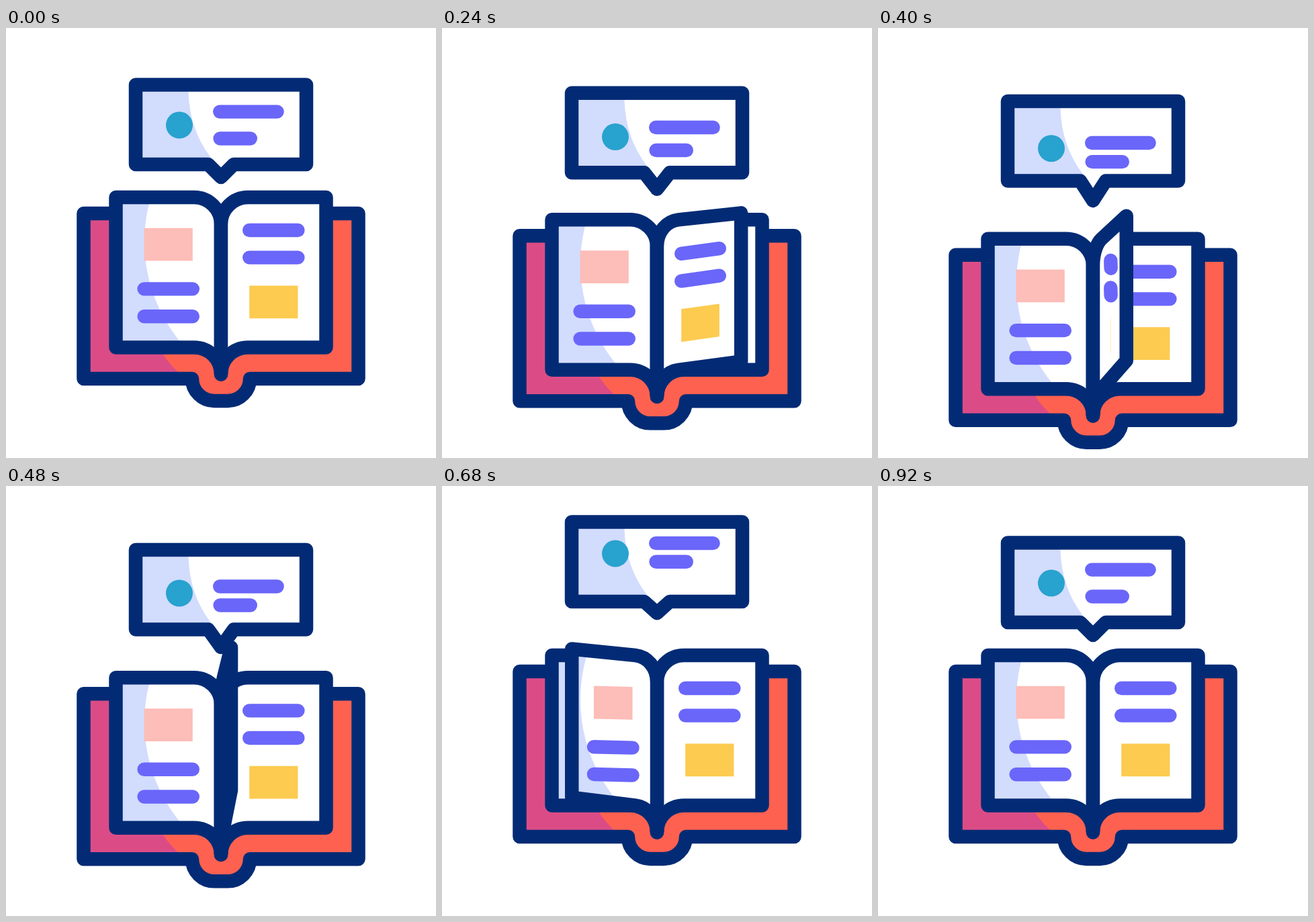
Animation of 640 by 640 pixels, one loop 2 s. Source, as an HTML page with a canvas:

```html
<!DOCTYPE html>
<html lang="en">
<head>
<meta charset="utf-8">
<title>Open book</title>
<style>
html, body { margin: 0; width: 100%; height: 100%; overflow: hidden; background: #fff; }
canvas { display: block; width: 640px; height: 640px; }
</style>
</head>
<body>
<canvas id="stage"></canvas>
<script>
const LOOP = 2000, STEP = 40;
const NAVY = '#032b75', WHITE = '#ffffff', SHADE = '#d2dcfd', VIOLET = '#6a66f9';
const CORAL = '#ff6150', MAGENTA = '#db4c86', PINK = '#fdbdb8', YELLOW = '#fdcb50', TEAL = '#28a2ce';
const RIGHT = 476.5, LEFT = 163.5, SPINE = 320;

const canvas = document.getElementById('stage');
const ctx = canvas.getContext('2d');
const ratio = window.devicePixelRatio || 1;
canvas.width = canvas.height = 640 * ratio;

const clamp = u => Math.max(0, Math.min(1, u));
const lerp = (a, b, u) => a + (b - a) * u;
const smooth = u => u * u * (3 - 2 * u);
const easeIn = u => u * u * (2 - u);
const soft = amount => u => lerp(u, smooth(u), amount);
const span = (t, from, to, ease) => ease(clamp((t - from) / (to - from)));

// Bubble parts sink to `low`, spring up to `high`, then settle.
function bounce(t, low, high) {
  if (t < 400) return low * span(t, 0, 400, easeIn);
  if (t < 680) return lerp(low, high, span(t, 400, 680, soft(0.4)));
  return high * (1 - span(t, 680, 920, soft(0.3)));
}

function bookDrop(t) {
  return 66.7 * (span(t, 120, 360, smooth) - span(t, 360, 600, smooth));
}

function pageEdge(t) {
  return t < 480
    ? lerp(RIGHT, 335, span(t, 100, 480, easeIn))
    : lerp(335, LEFT, span(t, 480, 740, soft(0.6)));
}

function fill(path, color) {
  ctx.fillStyle = color;
  ctx.fill(path);
}

function outline(path) {
  ctx.strokeStyle = NAVY;
  ctx.lineWidth = 20.5;
  ctx.stroke(path);
}

function bar(x1, y1, x2, y2) {
  ctx.strokeStyle = VIOLET;
  ctx.lineWidth = 20.4;
  ctx.beginPath();
  ctx.moveTo(x1, y1);
  ctx.lineTo(x2, y2);
  ctx.stroke();
}

function clipped(path, draw) {
  ctx.save();
  ctx.clip(path);
  draw();
  ctx.restore();
}

function drawBubble(t) {
  const box = bounce(t, 24.5, -31);
  const tip = bounce(t, 35, -32.8);
  const top = 84.5 + box, bottom = 203 + box;
  const shape = new Path2D(
    `M193 ${top}H447V${bottom}H339L320 ${222 + tip}L301 ${bottom}H193Z`);
  fill(shape, WHITE);
  clipped(shape, () => fill(new Path2D(
    `M193 ${top}H271.5V${top + 10}Q273 ${top + 67} 305 ${bottom - 10}V${bottom}H193Z`), SHADE));
  outline(shape);

  ctx.fillStyle = TEAL;
  ctx.beginPath();
  ctx.arc(258, 144.6 + bounce(t, 34.6, -44), 20, 0, Math.PI * 2);
  ctx.fill();

  const y1 = 124.6 + bounce(t, 46.4, -39.5);
  const y2 = 164.5 + bounce(t, 34.6, -51.8);
  bar(318.2, y1, 403.6, y1);
  bar(318.6, y2, 363.8, y2);
}

function drawCover() {
  const cover = new Path2D(
    'M115.5 276H524.5V522H363A33 33 0 0 1 330 555H310A33 33 0 0 1 277 522H115.5Z');
  fill(cover, CORAL);
  fill(new Path2D('M115.5 276H234V486Q243 500 256 512V522H115.5Z'), MAGENTA);
  outline(cover);
}

function shadePage() {
  const area = new Path2D('M163 252H441V480H163Z');
  area.arc(441, 318, 235, 0, Math.PI * 2);
  ctx.fillStyle = SHADE;
  ctx.fill(area, 'evenodd');
}

// Outline of one page; k is 0 when flat and 1 when its edge reaches the spine.
function pageShape(side, k) {
  const x = d => SPINE + side * d;
  const edge = 156.5 * (1 - k), knee = 40 * (1 - k);
  const high = 252 - 50 * k, low = 475.5 - 62 * k;
  const len = 22 * (1 - k);
  const slope = drop => {
    const run = edge - knee, size = Math.hypot(run, drop) || 1;
    return [len * run / size, len * drop / size];
  };
  const [ax, ay] = slope(50 * k), [bx, by] = slope(62 * k);
  return new Path2D(
    `M${x(0)} 292C${x(0)} 270 ${x(knee - ax)} ${252 + ay} ${x(knee)} 252` +
    `L${x(edge)} ${high}V${low}L${x(knee)} 475.5` +
    `C${x(knee - bx)} ${475.5 + by} ${x(0)} 493 ${x(0)} 515.5Z`);
}

function pageContent(side, k) {
  const near = SPINE + side * (42.2 - 33 * k + 14.9 * k * k);
  const far = SPINE + side * (114.4 - 98.5 * k - 45 * k * k);
  if ((far - near) * side < -1) return;
  const nearDy = side > 0 ? 14.4 * k - 32 * k * k : 6.5 * k;
  const farDy = side > 0 ? -34 * k + 13.6 * k * k : -k;
  const picture = side > 0 ? 383.4 : 297.8;
  const rows = side > 0 ? [301, 341.6] : [388.4, 429.2];

  ctx.fillStyle = side > 0 ? YELLOW : PINK;
  ctx.beginPath();
  ctx.moveTo(near, picture + nearDy);
  ctx.lineTo(far, picture + farDy);
  ctx.lineTo(far, picture + 48.8 + farDy);
  ctx.lineTo(near, picture + 48.8 + nearDy);
  ctx.fill();
  for (const y of rows) bar(near, y + nearDy, far, y + farDy);
}

function drawPage(side, k) {
  const shape = pageShape(side, k);
  fill(shape, WHITE);
  if (side < 0) clipped(shape, shadePage);
  pageContent(side, k);
  outline(shape);
}

function drawBook(t) {
  ctx.save();
  ctx.translate(0, bookDrop(t));
  drawCover();
  drawPage(-1, 0);
  drawPage(1, 0);
  if (t > 100 && t < 740) {
    const edge = pageEdge(t);
    const side = edge >= SPINE ? 1 : -1;
    drawPage(side, 1 - Math.abs(edge - SPINE) / 156.5);
  }
  ctx.restore();
}

function render(now) {
  const t = Math.floor((now % LOOP) / STEP) * STEP;
  ctx.setTransform(ratio, 0, 0, ratio, 0, 0);
  ctx.lineJoin = ctx.lineCap = 'round';
  ctx.fillStyle = WHITE;
  ctx.fillRect(0, 0, 640, 640);
  drawBubble(t);
  drawBook(t);
}

const start = performance.now();
function tick() {
  render(performance.now() - start);
  requestAnimationFrame(tick);
}
tick();
</script>
</body>
</html>
```
